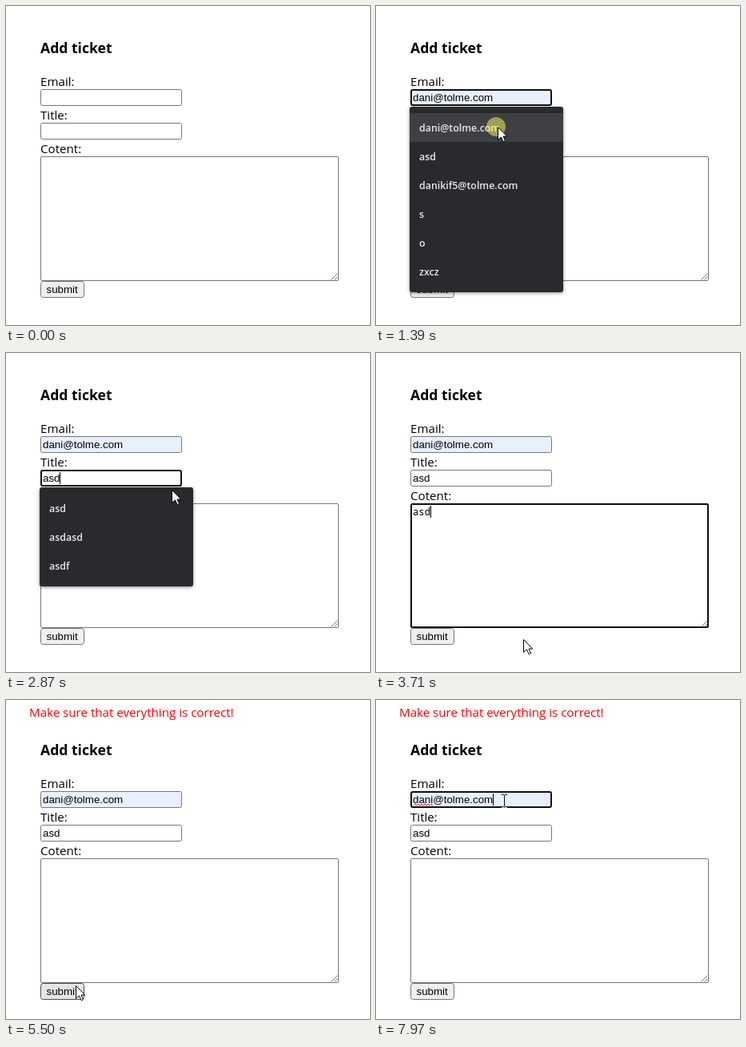
These frames come from a looping animation (455x399 px, 8 s). An HTML page with a canvas:

```html
<!DOCTYPE html>
<html lang="en">
<head>
<meta charset="utf-8">
<title>Add ticket</title>
<style>
html, body { margin: 0; width: 100%; height: 100%; overflow: hidden; background: #fff; }
canvas { display: block; }
</style>
</head>
<body>
<canvas id="stage" width="455" height="399"></canvas>
<script>
const LOOP = 8000, TICK = 76.5;
const ctx = document.getElementById('stage').getContext('2d');

const LABEL = '15.14px "Open Sans", "Noto Sans", sans-serif';
const HEAD = 'bold 17.6px "Open Sans", "Noto Sans", sans-serif';
const MENU = '600 12.4px "Open Sans", "Noto Sans", sans-serif';
const FIELD = '13.33px "Liberation Sans", Arial, sans-serif';
const MONO = '12.22px "Noto Sans Mono", "DejaVu Sans Mono", monospace';

const EMAIL = 'dani@tolme.com';
const EMAILS = [EMAIL, 'asd', 'danikif5@tolme.com', 's', 'o', 'zxcz'];
const TITLES = ['asd', 'asdasd', 'asdf', 's', 'zxc', 'o'];

const BOX = {
  email: [43, 104, 177, 21],
  title: [43, 146, 177, 21],
  content: [43, 188, 373, 156],
  submit: [43, 344, 55, 21]
};

// pointer moves: start, end, target x, target y
const START = [290, 410];
const MOVES = [
  [210, 440, 167, 121], [990, 1070, 152, 151], [1850, 1930, 179, 162],
  [2250, 2320, 183, 160], [2870, 3180, 304, 213], [3420, 3710, 184, 358],
  [3790, 4020, 150, 357], [4820, 5130, 87, 357], [6060, 6430, 118, 140],
  [6510, 6740, 123, 174], [7220, 7520, 160, 126]
];
const PRESSES = [[670, 760], [1320, 1400], [2490, 2560], [3250, 3420],
  [5200, 5350], [6910, 6990], [7600, 7750]];

// values that hold from a given time
const FOCUS = [[0, ''], [670, 'email'], [2560, 'title'], [3250, 'content'],
  [5200, ''], [6910, 'title'], [7600, 'email']];
const TITLE = [[0, ''], [2720, 'a'], [2790, 'as'], [2870, 'asd']];
const CONTENT = [[0, ''], [3490, 'a'], [3570, 'as'], [3640, 'asd'],
  [4490, 'as'], [4660, 'a'], [4740, '']];

const within = (t, a, b) => t >= a && t < b;
const hold = (list, t) => list.reduce((v, [from, val]) => t >= from ? val : v, '');

function pointer(t) {
  let [x, y] = START;
  for (const [a, b, tx, ty] of MOVES) {
    if (t < a) break;
    const n = Math.round((b - a) / TICK) + 1;
    const p = t >= b ? 1 : Math.min(n, Math.floor((t - a) / TICK) + 1) / n;
    x += (tx - x) * p;
    y += (ty - y) * p;
  }
  return [Math.round(x), Math.round(y)];
}

function text(str, x, y, font, color = '#000') {
  ctx.font = font;
  ctx.fillStyle = color;
  ctx.fillText(str, x, y);
}

function round(x, y, w, h, r) {
  ctx.beginPath();
  ctx.roundRect(x, y, w, h, r);
}

function control(name, s, fill, r = 2) {
  const [x, y, w, h] = BOX[name];
  const on = s.focus === name;
  const inset = on ? 1 : 0.5;
  round(x + inset, y + inset, w - 2 * inset, h - 2 * inset, r);
  ctx.fillStyle = fill;
  ctx.fill();
  ctx.lineWidth = on ? 2 : 1;
  ctx.strokeStyle = on ? '#101010' : s.hover === name ? '#4f4f4f' : '#767676';
  ctx.stroke();
}

function caret(x, y) {
  ctx.fillStyle = '#000';
  ctx.fillRect(Math.round(x), y, 1, 15);
}

function value(str, y, font, active) {
  text(str, 46, y, font);
  if (active) caret(46 + ctx.measureText(str).width, y - 12);
}

function squiggle(word, y) {
  ctx.font = FIELD;
  const end = 47 + ctx.measureText(word).width;
  ctx.beginPath();
  for (let x = 47, i = 0; x <= end; x += 2, i++) ctx.lineTo(x, y + (i % 2 ? 0 : 2));
  ctx.lineWidth = 1;
  ctx.strokeStyle = '#e03030';
  ctx.stroke();
}

function grip() {
  ctx.beginPath();
  for (const d of [8, 4]) {
    ctx.moveTo(414.5 - d, 342.5);
    ctx.lineTo(414.5, 342.5 - d);
  }
  ctx.lineWidth = 1;
  ctx.strokeStyle = '#777';
  ctx.stroke();
}

function menu(m) {
  ctx.save();
  ctx.shadowColor = 'rgba(0,0,0,.45)';
  ctx.shadowBlur = 4;
  ctx.shadowOffsetY = 1;
  ctx.fillStyle = '#292a2d';
  round(42, m.y, 192, m.items.length * 36 + 16, 3);
  ctx.fill();
  ctx.restore();
  if (m.lit) {
    ctx.fillStyle = '#3f4043';
    ctx.fillRect(42, m.y + 8, 192, 36);
  }
  m.items.forEach((item, i) => text(item, 54, m.y + 31 + i * 36, MENU, '#e8eaed'));
}

function beam(x, y) {
  ctx.save();
  ctx.globalCompositeOperation = 'difference';
  ctx.fillStyle = '#fff';
  ctx.fillRect(x, y - 7, 1, 15);
  for (const v of [y - 8, y + 8]) {
    ctx.fillRect(x - 3, v, 3, 1);
    ctx.fillRect(x + 1, v, 3, 1);
  }
  ctx.restore();
}

function arrow(x, y) {
  const pts = [[0, 0], [0, 16], [4, 12.4], [6.6, 18.2], [9, 17.2], [6.5, 11.5], [11.3, 11.5]];
  ctx.beginPath();
  for (const [dx, dy] of pts) ctx.lineTo(x + 0.5 + dx, y + 0.5 + dy);
  ctx.closePath();
  ctx.fillStyle = '#fff';
  ctx.fill();
  ctx.lineWidth = 1;
  ctx.strokeStyle = '#000';
  ctx.stroke();
}

function openMenu(t, title, dy) {
  if (within(t, 760, 1400)) return { y: 126, items: EMAILS, lit: t >= 1070 };
  if (within(t, 2560, 3250) || within(t, 6990, 7600)) {
    return { y: 168 + dy, items: TITLES.filter(s => s.startsWith(title)) };
  }
  return null;
}

function hit(x, y) {
  return Object.keys(BOX).find(k => {
    const [bx, by, w, h] = BOX[k];
    return x >= bx && x < bx + w && y >= by && y < by + h;
  });
}

function draw(t) {
  const failed = t >= 5500, dy = failed ? 10 : 0;
  const [px, py] = pointer(t);
  const title = hold(TITLE, t);
  const m = openMenu(t, title, dy);
  const overMenu = m && px < 234 && py >= m.y && py < m.y + m.items.length * 36 + 16;
  const shown = t >= 210;
  const s = { focus: hold(FOCUS, t), hover: shown && !overMenu ? hit(px, py - dy) : '' };
  const filled = t >= 1070;

  ctx.fillStyle = '#fff';
  ctx.fillRect(0, 0, 455, 399);
  if (failed) text('Make sure that everything is correct!', 29, 21, LABEL, '#f00');

  ctx.save();
  ctx.translate(0, dy);
  text('Add ticket', 43, 59, HEAD);
  text('Email:', 43, 100, LABEL);
  text('Title:', 43, 142, LABEL);
  text('Cotent:', 43, 184, LABEL);

  control('email', s, filled ? '#e8f0fe' : '#fff');
  control('title', s, '#fff');
  control('content', s, '#fff', 1.5);
  control('submit', s, s.hover === 'submit' ? '#e5e5e5' : '#efefef', 3);
  grip();

  value(filled ? EMAIL : '', 119, FIELD, s.focus === 'email' && !within(t, 1070, 1400));
  value(title, 161, FIELD, s.focus === 'title');
  value(hold(CONTENT, t), 203, MONO, s.focus === 'content' && !within(t, 4170, 4660));
  if (within(t, 1850, 2560) || t >= 7680) squiggle('dani', 120);
  text('submit', 50.5, 359, FIELD);
  ctx.restore();

  if (m) menu(m);
  if (!shown) return;

  if (PRESSES.some(([a, b]) => within(t, a, b))) {
    ctx.save();
    ctx.globalCompositeOperation = overMenu ? 'source-over' : 'multiply';
    ctx.fillStyle = overMenu ? 'rgba(255,255,100,.5)' : '#ffff80';
    ctx.beginPath();
    ctx.arc(px - 2, py, 12, 0, Math.PI * 2);
    ctx.fill();
    ctx.restore();
  }
  if (s.hover && s.hover !== 'submit') beam(px, py);
  else arrow(px, py);
}

const began = performance.now();
function frame() {
  draw((performance.now() - began) % LOOP);
  requestAnimationFrame(frame);
}
frame();
</script>
</body>
</html>
```
